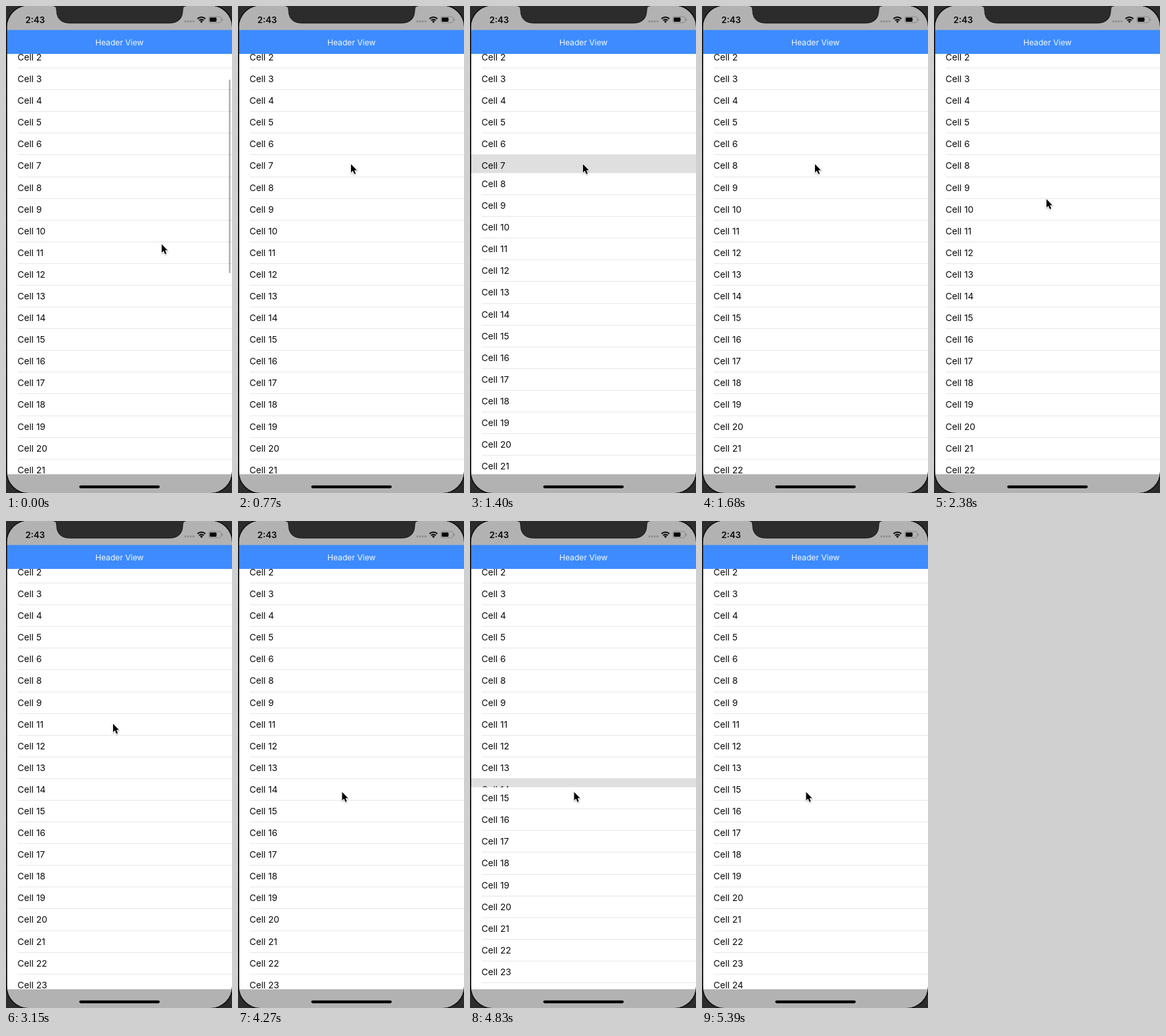
These frames come from a looping animation (344x742 px, 5530 ms). An HTML page with a canvas:

```html
<!DOCTYPE html>
<html lang="en">
<head>
<meta charset="utf-8">
<title>List with deletable cells</title>
<style>
  html, body { margin: 0; height: 100%; overflow: hidden; background: #2c2c2c; }
  canvas { display: block; width: 344px; height: 742px; }
</style>
</head>
<body>
<canvas id="stage"></canvas>
<script>
const W = 344, H = 742, LOOP = 5530, STEP = 70;
const ROW = 33.09, FIRST_TOP = 61.5, LEFT = 1.5;
const FONT = 'Inter, Roboto, sans-serif';
const BEZEL = '#2c2c2c', RIM = '#111', BAR = '#b2b2b2', BLUE = '#3d8bff';

// Cell number, time of the highlight, start of the collapse
const deletions = [[7, 980, 1322], [10, 2730, 2840], [14, 4550, 4660]];
const COLLAPSE = 300;

const canvas = document.getElementById('stage');
const ctx = canvas.getContext('2d');
const dpr = window.devicePixelRatio || 1;
canvas.width = W * dpr;
canvas.height = H * dpr;
ctx.scale(dpr, dpr);

const smooth = u => u * u * (3 - 2 * u);
const easeOut = u => 1 - (1 - u) ** 2;

// Pointer moves: start, end, from, to, easing, sideways bulge
const moves = [
  [280, 770, [237, 363], [172, 241], smooth, 0],
  [1890, 2590, [172, 241], [163, 309], smooth, 16],
  [3430, 4270, [163, 309], [158.5, 413], easeOut, 0]
];

function progress(t, start, end) {
  return Math.min(1, Math.max(0, (t - start) / (end - start)));
}

function box(x, y, w, h, color) {
  ctx.fillStyle = color;
  ctx.fillRect(x, y, w, h);
}

function pill(x, y, w, h, r, color) {
  ctx.fillStyle = color;
  ctx.beginPath();
  ctx.roundRect(x, y, w, h, r);
  ctx.fill();
}

function text(str, x, y, size, color, weight = 400, align = 'left') {
  ctx.font = `${weight} ${size}px ${FONT}`;
  ctx.textAlign = align;
  ctx.fillStyle = color;
  ctx.fillText(str, x, y);
}

function drawRows(t) {
  let top = FIRST_TOP, previousLit = false;
  for (let n = 2; top < 714; n++) {
    const deletion = deletions.find(d => d[0] === n);
    const lit = Boolean(deletion) && t >= deletion[1];
    const gone = deletion ? smooth(progress(t, deletion[2], deletion[2] + COLLAPSE)) : 0;
    if (gone < 1) {
      const y = previousLit ? top : Math.floor(top);
      box(LEFT, y, W, ROW + 1, lit ? '#dfdfdf' : '#fff');
      if (!lit && !previousLit) box(18, y, W, 1, '#e7e7e7');
      text(`Cell ${n}`, 17.6, top + 21.5, 13.65, '#0a0a0a');
      previousLit = lit;
    }
    top += ROW * (1 - gone);
  }
}

function drawStatusBar() {
  box(0, 0, W, 37, BAR);
  text('2:43', 44.3, 25.8, 13.3, '#0a0a0a', 600, 'center');

  for (let i = 0; i < 4; i++) pill(271.5 + i * 4.1, 22, 3, 3, 1, '#8f8f8f');

  ctx.strokeStyle = '#0a0a0a';
  ctx.lineWidth = 2;
  for (const r of [5, 8.4]) {
    ctx.beginPath();
    ctx.arc(297.5, 25.5, r, -Math.PI * 0.75, -Math.PI * 0.25);
    ctx.stroke();
  }
  ctx.fillStyle = '#0a0a0a';
  ctx.beginPath();
  ctx.moveTo(297.5, 26);
  ctx.arc(297.5, 25.5, 3, -Math.PI * 0.75, -Math.PI * 0.25);
  ctx.fill();

  ctx.strokeStyle = '#868686';
  ctx.lineWidth = 0.9;
  ctx.beginPath();
  ctx.roundRect(308.5, 16, 19, 9.5, 2.6);
  ctx.stroke();
  pill(310, 17.5, 10.5, 6.5, 1.4, '#0a0a0a');
  pill(328.6, 19, 1.2, 3.5, 0.6, '#868686');
}

function drawBezel() {
  ctx.fillStyle = BEZEL;
  ctx.beginPath();
  ctx.rect(0, 0, W, H);
  ctx.roundRect(LEFT, -0.5, W - LEFT, H + 0.5, 33);
  ctx.fill('evenodd');

  // Dark rim between the bezel and the screen
  ctx.strokeStyle = RIM;
  ctx.lineWidth = LEFT;
  ctx.beginPath();
  ctx.roundRect(LEFT / 2, -0.5 - LEFT / 2, W, H + 0.5 + LEFT, 33.5);
  ctx.stroke();

  const notch = new Path2D(`M72 0Q77 0 77 6C77 19 84 26 97 26H249
    C262 26 269 19 269 6Q269 0 274 0`);
  ctx.lineWidth = 1;
  ctx.fillStyle = BEZEL;
  ctx.fill(notch);
  ctx.stroke(notch);
}

function drawPointer(t) {
  let [x, y] = moves[0][2];
  for (const [start, end, from, to, ease, bulge] of moves) {
    if (t < start) break;
    const p = ease(progress(t, start, end));
    x = from[0] + (to[0] - from[0]) * p + bulge * Math.sin(Math.PI * p) ** 2;
    y = from[1] + (to[1] - from[1]) * p;
  }
  ctx.save();
  ctx.translate(x, y);
  const arrow = new Path2D('M0 0V12.8L2.9 10.1L5 15.1L7.2 14.2L5.1 9.3H9Z');
  ctx.shadowColor = 'rgba(0,0,0,.3)';
  ctx.shadowBlur = 2 * dpr;
  ctx.shadowOffsetY = dpr;
  ctx.lineWidth = 1.6;
  ctx.strokeStyle = '#fff';
  ctx.stroke(arrow);
  ctx.shadowColor = 'transparent';
  ctx.fillStyle = '#000';
  ctx.fill(arrow);
  ctx.restore();
}

function draw(t) {
  drawRows(t);
  const fade = 1 - progress(t, 0, 210);
  pill(339.3, 112, 2.4, 295, 1.2, `rgba(0,0,0,${0.32 * fade})`);
  drawStatusBar();
  box(0, 36.6, W, 36.4, BLUE);
  text('Header View', 172.7, 60, 12.15, '#f4f8ff', 400, 'center');
  box(0, 713.4, W, 29, BAR);
  pill(111.5, 730.5, 122.5, 4.2, 2.1, '#000');
  drawBezel();
  drawPointer(t);
}

const begin = performance.now();
function tick() {
  const t = (performance.now() - begin) % LOOP;
  draw(Math.floor(t / STEP) * STEP);
  requestAnimationFrame(tick);
}
tick();
</script>
</body>
</html>
```
